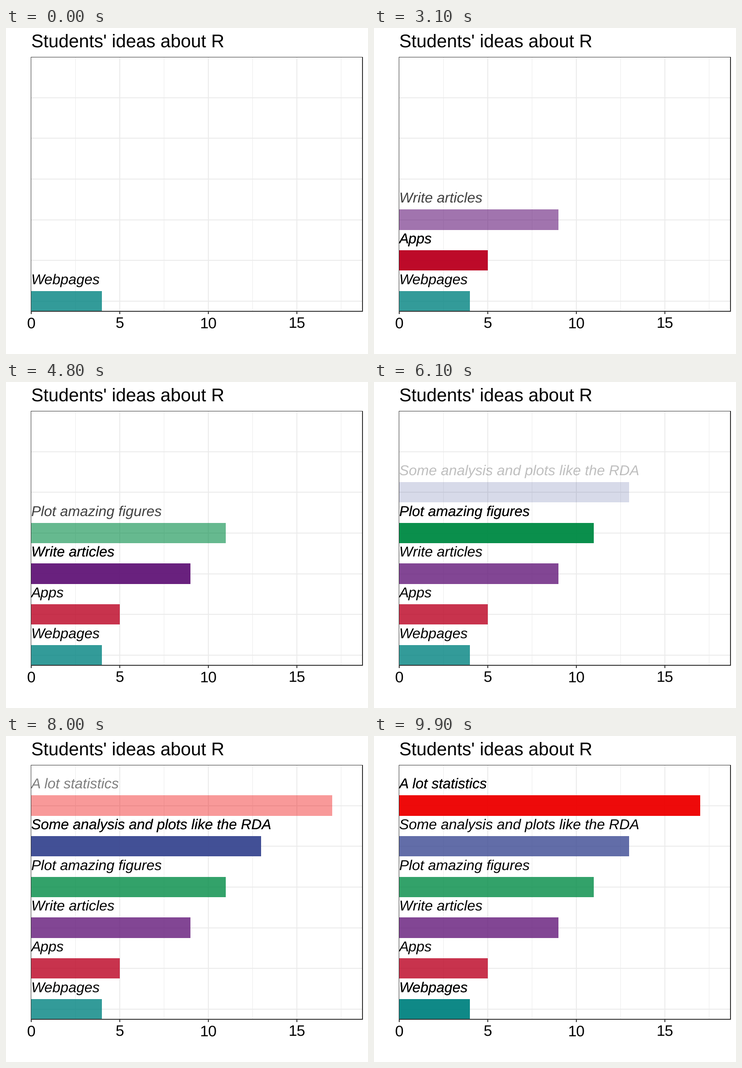
Animation, 789 px wide and 710 px high, one loop 10000 ms. Source, as a matplotlib script:

```python
import matplotlib.pyplot as plt
from matplotlib.animation import FuncAnimation
from matplotlib.patches import Rectangle

W, H, DPI = 789, 710, 100
FRAMES, INTERVAL = 100, 100
X0, UNIT = 54.6, 38.6            # pixel of zero, pixels per count
Y0, ROW, HALF = 595.0, 88.67, 22.17
LEFT, RIGHT, TOP, BOTTOM = 54, 778, 63, 618
BAR_ALPHA, STEPS = 0.8, 8
STARTS = [9, 26, 43, 60, 77, 93]  # first frame of each transition
INK, MAJOR = "#333333", "#ebebeb"

BARS = [
    ("Webpages", 4, "#008280"),
    ("Apps", 5, "#BB0021"),
    ("Write articles", 9, "#631879"),
    ("Plot amazing figures", 11, "#008B45"),
    ("Some analysis and plots like the RDA", 13, "#3B4992"),
    ("A lot statistics", 17, "#EE0000"),
]

plt.rcParams.update({
    "font.family": "Liberation Sans",
    "text.hinting": "none",
    "text.kerning_factor": 6,
})

fig = plt.figure(figsize=(W / DPI, H / DPI), dpi=DPI, facecolor="white")
ax = fig.add_axes([0, 0, 1, 1])
ax.set_xlim(0, W)
ax.set_ylim(H, 0)
ax.axis("off")


def box(x1, y1, x2, y2, color, z):
    patch = Rectangle((x1, y1), x2 - x1, y2 - y1, facecolor=color,
                      linewidth=0, snap=False, zorder=z)
    return ax.add_patch(patch)


def label(x, y, s, px, z=6, **kw):
    return ax.text(x, y, s, fontsize=px * 72 / DPI, color="black",
                   va="baseline", zorder=z, **kw)


def x_at(count):
    return X0 + UNIT * count


def draw_grid():
    for count in (2.5, 7.5, 12.5, 17.5):
        x = int(x_at(count))
        box(x, TOP, x + 1, BOTTOM, MAJOR, 1)
    for i in range(len(BARS)):
        y = round(Y0 - ROW * i)
        box(LEFT, y - 1, RIGHT, y + 1, MAJOR, 1)
    for count in (5, 10, 15):
        x = round(x_at(count))
        box(x - 1, TOP, x + 1, BOTTOM, MAJOR, 1)


def draw_frame():
    box(LEFT, TOP, RIGHT, TOP + 1, INK, 5)
    box(LEFT, TOP, LEFT + 1, BOTTOM, INK, 5)
    box(RIGHT - 2, TOP, RIGHT, BOTTOM, INK, 5)
    box(LEFT, BOTTOM - 2, RIGHT, BOTTOM, INK, 5)
    for count in (0, 5, 10, 15):
        x = round(x_at(count))
        box(x - 1, BOTTOM, x + 1, BOTTOM + 5, INK, 5)
        label(x_at(count), 653.5, str(count), 33.3, ha="center")
    label(X0, 43, "Students' ideas about R", 39.7)


def make_layer(z):
    layer = []
    for i, (name, count, color) in enumerate(BARS):
        y = Y0 - ROW * i
        bar = box(LEFT + 1, round(y - HALF), round(x_at(count)),
                  min(round(y + HALF), BOTTOM - 2), color, z)
        text = label(X0, y - 37.5, name, 31.4, z + 1, style="italic")
        layer.append((bar, text))
    return layer


def show(item, level):
    bar, text = item
    bar.set_alpha(BAR_ALPHA * level)
    text.set_alpha(level)
    for artist in item:
        artist.set_visible(level > 0)


draw_grid()
draw_frame()
past = make_layer(2)
live = make_layer(3)


def update(n):
    cur = sum(s <= n for s in STARTS)
    p = min((n - STARTS[cur - 1] + 1) / STEPS, 1) if cur else 1
    levels = [0] * len(BARS)
    levels[cur % len(BARS)] = p
    if p < 1:
        levels[cur - 1] = 1      # outgoing bar stays over its own mark
    for i in range(len(BARS)):
        show(past[i], 1 if i < cur else 0)
        show(live[i], levels[i])
    return [artist for item in past + live for artist in item]


anim = FuncAnimation(fig, update, frames=FRAMES, interval=INTERVAL,
                     repeat=True, repeat_delay=0, blit=False)
plt.show()
```
